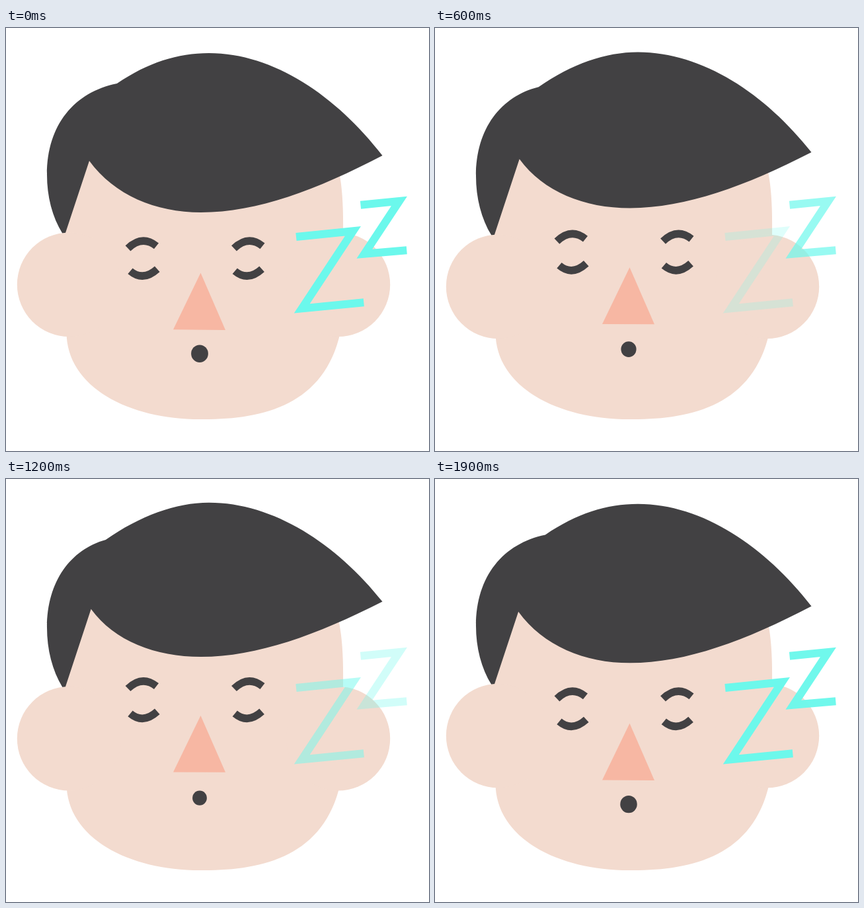
An HTML page with a canvas that plays this animation: 640 px wide and 640 px high, repeating every 2000 ms.

```html
<!DOCTYPE html>
<html lang="en">
<head>
<meta charset="utf-8">
<title>Sleeping face</title>
<style>
  html, body { margin: 0; width: 100%; height: 100%; overflow: hidden; background: #fff; }
  canvas { display: block; width: 640px; height: 640px; }
</style>
</head>
<body>
<canvas id="stage" width="640" height="640"></canvas>
<script>
const ctx = document.getElementById('stage').getContext('2d');
const LOOP = 2000, STEP = 100;
const SKIN = '#f3dbcf', DARK = '#424143', NOSE = '#f7b7a3', CYAN = '#6bf8ec';

const ease = x => (1 - Math.cos(Math.PI * x)) / 2;

function fill(d, color) {
  ctx.fillStyle = color;
  ctx.fill(new Path2D(d));
}

function line(d, color, width) {
  ctx.strokeStyle = color;
  ctx.lineWidth = width;
  ctx.stroke(new Path2D(d));
}

function oval(x, y, rx, ry, color) {
  ctx.fillStyle = color;
  ctx.beginPath();
  ctx.ellipse(x, y, rx, ry, 0, 0, Math.PI * 2);
  ctx.fill();
}

// 0 at rest, 1 at the top of the breath
function breath(t) {
  const c = Math.cos((t - 1050) / LOOP * Math.PI * 2);
  return (1 + c) / 2 + 0.05 * (1 - c * c);
}

// Fades from 1 down to low at time dip, then back to 1
function fade(t, dip, low) {
  const k = t < dip ? ease(t / dip) : 1 - ease((t - dip) / (LOOP - dip));
  return 1 - (1 - low) * k;
}

function drawHair(p) {
  const m = (a, d) => a + d * p;
  fill(`M89 ${m(313, 4.5)} L85.5 ${m(311, 4.5)}
    C70 ${m(286, 4)} 62 ${m(255, 3)} 62 ${m(222, 3)}
    C62 ${m(146, 9)} ${m(104, -6)} ${m(97, 10)} ${m(168, -18)} ${m(84, 8.4)}
    C${m(215, -13)} ${m(52, 4)} ${m(260, -3)} ${m(38, -2.3)} 307 ${m(38, -2.3)}
    C405 ${m(38, -2.3)} 500 ${m(103, -5)} 569.5 ${m(193, -7.8)}
    C470 ${m(245, -9.5)} 380 ${m(279, -10.4)} 295 ${m(279, -10.4)}
    C226 ${m(279, -10.4)} 164 ${m(253, -8)} ${m(126, 2.8)} ${m(201, -4.4)} Z`, DARK);
}

function drawEyes(p) {
  const up = 17.3 * p, low = 13.6 * p;
  for (const dx of [0, 160.5]) {
    line(`M${184.5 + dx} ${333.5 - up} Q${206 + dx} ${313 - up} ${227.5 + dx} ${330 - up}`, DARK, 11.3);
  }
  for (const dx of [0, 158.3]) {
    line(`M${188 + dx} ${367.8 - low} Q${207.5 + dx} ${384.2 - low} ${228.8 + dx} ${364.8 - low}`, DARK, 11.3);
  }
}

function drawZ(d, alpha) {
  ctx.globalAlpha = alpha;
  line(d, CYAN, 12);
  ctx.globalAlpha = 1;
}

function draw(t) {
  const p = breath(t);
  ctx.fillStyle = '#fff';
  ctx.fillRect(0, 0, 640, 640);

  fill(`M91.5 460 L88 302 L126 193 L500 200 C508 230 511 262 510 320 L506 460
    C482 570 390 592 300 592 C190 594 91.5 545 91.5 460 Z`, SKIN);
  drawHair(p);
  for (const x of [95.5, 502.5]) oval(x, 388.2 + 4.8 * p, 78.7, 78.7, SKIN);

  drawEyes(p);
  fill(`M294.5 ${370.5 - 13.2 * p} L332 ${457 - 13.8 * p} L253 ${456.3 - 13.3 * p} Z`, NOSE);
  oval(293, 492.8 - 10.7 * p, 12.9 - 2.1 * p, 13.3 - 2.2 * p, DARK);

  drawZ('M439 316 L525 307.2 L447.7 424.4 L541.3 415.3', fade(t, 650, 0.2));
  drawZ('M536.5 267.7 L595 261.9 L542.3 341.7 L606.3 336.2', fade(t, 1300, 0.3));
}

function frame() {
  const t = performance.now() % LOOP;
  draw(Math.floor(t / STEP) * STEP);
  requestAnimationFrame(frame);
}
ctx.miterLimit = 10;
frame();
</script>
</body>
</html>
```
